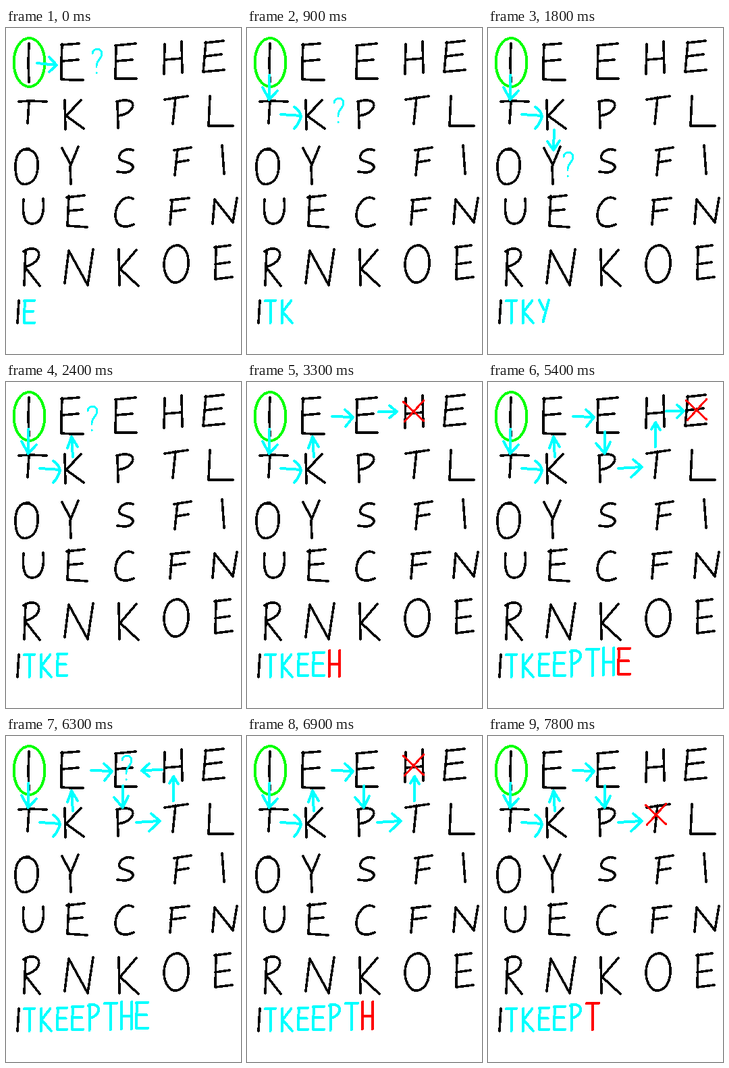
An HTML page for the animation above (8000 ms loop, 348x483 px).

```html
<!DOCTYPE html>
<html lang="en">
<head>
<meta charset="utf-8">
<title>Letter grid path search</title>
<style>
  html, body { margin: 0; width: 100%; height: 100%; overflow: hidden; background: #fff; }
  svg { display: block; width: 100vw; height: 100vh; }
  path, ellipse {
    fill: none; stroke-width: 4; stroke-linecap: round; stroke-linejoin: round;
    vector-effect: non-scaling-stroke; shape-rendering: crispEdges;
  }
  .ink { stroke: #000; }
  .ink path { stroke-width: 3.6; }
  .start { stroke: #0f0; }
  .go { stroke: #0ff; }
  .bad { stroke: #f00; }
  .thin { stroke-width: 3; }
</style>
</head>
<body>
<svg viewBox="0 0 348 483">
  <g class="ink">
    <path d="M34 23L33 52L34 80M83 24L82 50V76M82 25L108 23M84 49L107 47M82 76L97 77L114 77"/>
    <path d="M163 26L162 75M162 26L192 23M163 49L187 47M162 75L193 75"/>
    <path d="M235 24L234 68M260 20L261 66M235 47L260 45"/>
    <path d="M296 21L292 65M295 22L322 19M294 42L319 39M292 65L323 62"/>
    <path d="M19 109L35 108L60 109M34 109L32 141M87 107L88 150M111 107L89 130L115 149"/>
    <path d="M165 109L166 148M164 109C181 104 191 109 187 118C183 126 174 129 166 130"/>
    <path d="M235 106L269 101M251 103L247 142M302 101L300 145H336"/>
    <path d="M34 179C19 178 13 192 14 209C15 228 22 233 31 231C44 228 48 214 47 198C46 186 39 179 28 180"/>
    <path d="M83 178L95 201M107 176L95 205L96 231"/>
    <path d="M188 181C175 176 164 188 169 195C175 199 190 200 188 207C185 216 173 214 165 213"/>
    <path d="M254 180L250 218M249 181L274 177M252 199L270 196M320 174L323 216"/>
    <path d="M26 254C24 276 27 290 38 290C54 290 57 272 55 253"/>
    <path d="M93 249L91 293L120 295M90 251L116 248M92 271L113 269"/>
    <path d="M188 253C175 246 162 262 162 278C163 297 178 296 189 291"/>
    <path d="M246 255L243 291M244 255L271 252M244 272L265 269M306 290L309 254L336 288L342 252"/>
    <path d="M29 329L27 381M26 331C40 322 52 329 48 340C44 349 36 352 28 354L50 382"/>
    <path d="M87 378L93 330L121 381L129 328M167 328L168 381M193 329L169 357L196 382"/>
    <path d="M256 322C241 321 234 335 234 352C235 368 243 379 253 377C266 374 271 359 270 344C269 331 263 322 252 322"/>
    <path d="M311 324L310 372L335 369M309 325L332 322M310 350L331 347M19 404L17 437"/>
  </g>
  <ellipse class="start" cx="34.500" cy="51" rx="23" ry="36"/>
  <g id="trail"></g>
</svg>
<script>
const LOOP = 8000;

// Handwritten capitals in a unit box, stretched to their slot below the grid.
const GLYPHS = {
  E: "M.05 0L0 1H1M0 0H1M0 .48H.9",
  T: "M0 0H1M.5 0V1",
  K: "M0 0V1M.9 0L.05 .5L1 1",
  P: "M.1 0V1M0 .04C.7-.08 1.1 .1 1 .25C.9 .4 .5 .5 .1 .52",
  H: "M0 0V1M1 0V1M0 .52H1",
  Y: "M0 0L.5 .45M1 0L.4 1",
  L: "M0 0L.05 1H1.2",
  F: "M0 0V1M0 0H1M0 .5H.8"
};

// Slots: x, top, width, bottom
const SLOTS = [
  [27, 404, 15, 437], [52, 404, 15, 437], [76, 403, 14, 435], [98, 401, 16, 435],
  [122, 398, 15, 436], [146, 396, 18, 435], [171, 394, 15, 434], [193, 395, 17, 433]
];

// Moves: letter, arrow, centre of the entered cell, top of its question mark
const MOVES = {
  e1: ["E", "M46 52L75 55M64 43L75 55L64 65", [98, 49], [135, 32]],
  t1: ["T", "M33 70V106M23 88L33 106L45 93", [36, 124], [64, 103]],
  k:  ["K", "M50 128L80 130M70 117Q78 122 80 131Q77 142 70 149", [100, 128], [136, 105]],
  p0: ["P", "M122 127L156 128M144 115L156 128L144 140", [172, 128], [207, 103]],
  y:  ["Y", "M98 151L97 180M88 168L97 181L106 167", [95, 201], [119, 185]],
  e2: ["E", "M99 111L97 81M91 98L97 81L106 96", [98, 49], [128, 37]],
  e3: ["E", "M126 51L157 52M145 41L157 52L146 66", [176, 49], [203, 29]],
  h0: ["H", "M195 44H222M211 35L222 44L211 53", [247, 43], [280, 24]],
  p:  ["P", "M173 74V106M160 91L173 106L181 89", [176, 128], [207, 103]],
  t:  ["T", "M193 128L227 126M215 115L228 126L212 141", [249, 116], [278, 103]],
  l:  ["L", "M267 119L296 122M284 110L297 122L287 134", [318, 124], [323, 102]],
  h:  ["H", "M248 96V60M242 70L248 60L255 71", [247, 43], [279, 24]],
  e4: ["E", "M264 43L289 43M280 34L290 43L280 53", [309, 41], [335, 19]],
  e5: ["E", "M231 50L201 51M212 41L201 51L212 60", [172, 50], [179, 30]],
  f:  ["F", "M254 143L257 175M247 164L257 176L265 163", [260, 197], [283, 182]]
};

// Start time, moves so far, rejected flag
const STEPS = [
  [0, "e1"], [300, "e1", 1],
  [600, "t1"], [900, "t1 k"],
  [1200, "t1 k p0"], [1500, "t1 k p0", 1],
  [1800, "t1 k y"], [2100, "t1 k y", 1],
  [2400, "t1 k e2"], [2700, "t1 k e2 e3"],
  [3000, "t1 k e2 e3 h0"], [3300, "t1 k e2 e3 h0", 1],
  [3600, "t1 k e2 e3 p"], [3900, "t1 k e2 e3 p t"],
  [4200, "t1 k e2 e3 p t l"], [4500, "t1 k e2 e3 p t l", 1],
  [4800, "t1 k e2 e3 p t h"], [5100, "t1 k e2 e3 p t h e4"],
  [5400, "t1 k e2 e3 p t h e4", 1],
  [6300, "t1 k e2 e3 p t h e5"], [6600, "t1 k e2 e3 p t h e5", 1],
  [6900, "t1 k e2 e3 p t h", 1],
  [7200, "t1 k e2 e3 p t f"], [7500, "t1 k e2 e3 p t f", 1],
  [7800, "t1 k e2 e3 p t", 1]
];

const stroke = (kind, d, transform = "") =>
  `<path class="${kind}" d="${d}" transform="${transform}"/>`;

const cross = ([x, y]) =>
  stroke("bad thin", `M${x - 16} ${y - 14}l31 29M${x + 15} ${y - 16}l-29 32`);

const question = ([x, y]) =>
  stroke("go thin", `M${x - 7} ${y + 6}c1-9 14-9 14 0c0 8-9 10-8 20m0 8v1`);

function letter(char, slot, kind) {
  const [x, top, width, bottom] = SLOTS[slot];
  return stroke(kind, GLYPHS[char], `translate(${x} ${top}) scale(${width} ${bottom - top})`);
}

function draw([, route, rejected]) {
  const moves = route.split(" ").map(key => MOVES[key]);
  const last = moves.length - 1;
  const trail = moves.map(([char, arrow], i) =>
    stroke("go", arrow) + letter(char, i, rejected && i === last ? "bad" : "go"));
  const [, , cell, mark] = moves[last];
  return trail.join("") + (rejected ? cross(cell) : question(mark));
}

const layer = document.getElementById("trail");
const scenes = STEPS.map(draw);
const origin = performance.now();
let shown = -1;

function tick(now) {
  const time = Math.max(0, now - origin) % LOOP;
  const current = STEPS.filter(([start]) => start <= time).length - 1;
  if (current !== shown) layer.innerHTML = scenes[shown = current];
  requestAnimationFrame(tick);
}
tick(origin);
</script>
</body>
</html>
```
